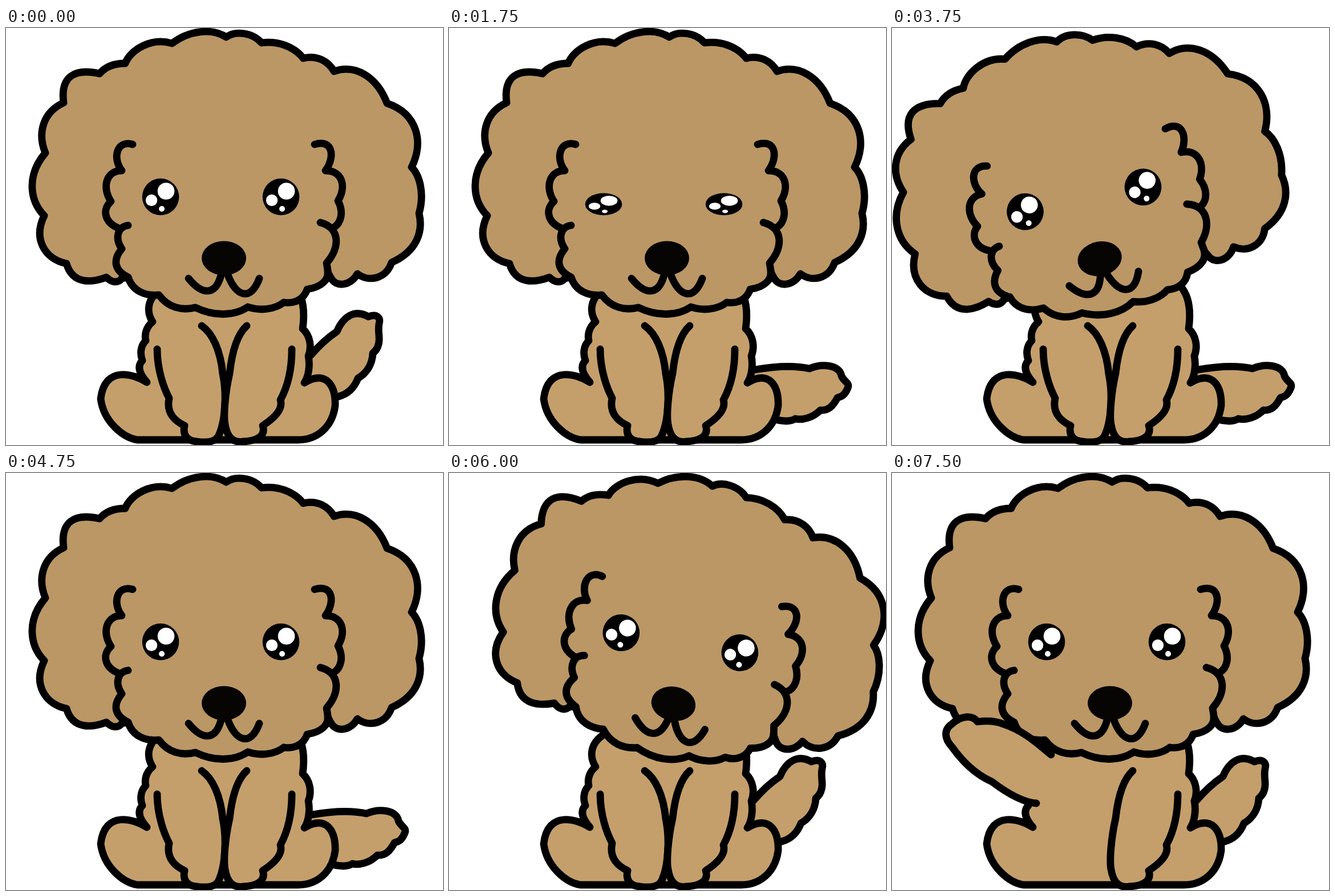
Recreate the animation shown at these times as an HTML page. Size 766 by 731 pixels, loop 7.75 s.

```html
<!DOCTYPE html>
<html lang="en">
<head>
<meta charset="utf-8">
<title>Puppy</title>
<style>
  html, body { margin: 0; width: 100%; height: 100%; overflow: hidden; background: #fff; }
  svg { display: block; width: 100vw; height: 100vh; }
  .line { stroke: #000; stroke-width: 12.8; stroke-linecap: round; stroke-linejoin: round; fill: none; }
  .coat { fill: #c49f6c; }
  .head { fill: #bb9766; }
</style>
</head>
<body>
<svg viewBox="0 0 766 731">
  <defs>
    <g id="eye">
      <circle cy="-32" r="32.3"/>
      <g fill="#fff">
        <circle cx="9.5" cy="-42" r="14.8"/>
        <circle cx="-16" cy="-26" r="10.2"/>
        <circle cx="2" cy="-11" r="5"/>
      </g>
    </g>
  </defs>

  <g id="tailUp">
    <path class="coat" d="M532 579L580 532C592 505 612 494 635 506L654 518L654 543L643 570L617 614L583 646L540 640Z"/>
    <path class="line coat" d="M534 574Q555 549 580 532C592 504 612 493 635 506C650 500 657 508 654 518C652 530 654 535 654 543C655 555 650 565 643 570C642 590 632 605 617 614C610 632 598 642 583 646"/>
  </g>
  <g id="tailDown">
    <path class="coat" d="M532 601L632 598L687 610L607 684L570 687L545 650Z"/>
    <path class="line coat" d="M536 599C570 593 605 591 632 597C655 587 685 591 688 610C693 621 703 622 699 631C693 646 685 647 681 648C673 663 665 671 651 670C638 683 620 688 607 685C598 691 585 689 575 687"/>
  </g>

  <path class="line coat" d="M272 458C245 475 247 500 257 515C244 525 243 540 245 548C235 558 235 572 239 583C230 592 233 605 247 621C225 607 173 590 166 650C171 690 205 718 230 722H512C545 722 572 700 577 662C578 625 560 600 523 622C531 610 533 590 530 575C536 560 534 540 520 527C523 505 524 472 505 452"/>
  <path id="armDown" class="line coat" d="M265 563C265 600 277 632 286 649C280 676 298 690 313 697C309 714 318 724 335 725C350 727 366 726 372 716C385 690 387 640 380 607C376 565 362 535 343 522"/>
  <path class="line coat" d="M422 522C402 540 395 578 392 605C384 640 381 680 384 695C388 720 400 727 415 725C440 724 456 715 450 697C470 684 486 668 481 652C493 630 501 600 501 563"/>

  <g id="head">
    <path class="line head" d="M209 62C218 38 255 16 291 27C320 5 360 -1 386 16C402 4 432 8 448 26C475 22 505 32 521 53C545 47 565 58 575 76C612 63 650 85 668 132C721 150 733 200 711 244C725 258 734 290 724 325C732 358 719 392 676 411C666 440 636 446 616 431C604 452 578 456 569 437L564 428C565 440 555 454 528 458C522 476 505 484 487 481C470 494 445 496 424 489C400 505 365 506 332 490C308 496 284 490 268 468C245 470 222 462 214 437L203 439C195 449 184 445 176 437C152 446 117 451 106 413C68 405 47 370 67 329C39 300 38 255 69 219C55 185 64 148 101 131C95 85 120 70 164 80C175 67 190 62 209 62Z"/>
    <path class="line" d="M222 204C194 196 186 228 203 250C175 250 168 280 184 304C168 318 172 342 200 352M214 346C196 348 190 368 203 387C188 405 188 424 214 437"/>
    <path class="line" d="M541 204C572 194 578 225 560 250C590 250 597 278 582 303C592 322 588 342 574 350M551 341C586 350 586 385 562 412L565 432"/>
    <path class="line" d="M320 439C346 471 368 467 377 433M389 433C403 471 429 480 444 439"/>
    <ellipse cx="382" cy="403.5" rx="39" ry="30" fill="#070404"/>
    <use id="eyeL" href="#eye"/>
    <use id="eyeR" href="#eye"/>
  </g>

  <path id="armUp" class="line coat" d="M279 494C250 470 230 452 195 440C180 434 165 434 150 436C140 423 120 426 105 440C90 450 92 466 105 480C125 508 150 530 175 541C200 560 228 577 253 579"/>
</svg>
<script>
  const STEP = 250, COUNT = 31;

  // [first step, last step, pose]
  const poses = [
    [5, 7, 'blink'],
    [8, 10, 'left'],
    [14, 16, 'left'],
    [22, 24, 'right'],
    [28, 30, 'wave'],
  ];
  const tilts = {
    left: 'translate(-18 1) rotate(-11.8 382 403)',
    right: 'translate(11.5 1) rotate(9.55 382 403)',
  };

  const el = id => document.getElementById(id);
  const show = (id, on) => el(id).setAttribute('display', on ? 'inline' : 'none');
  const move = (id, value) => el(id).setAttribute('transform', value);

  function draw(step) {
    const hit = poses.find(([a, b]) => step >= a && step <= b);
    const pose = hit ? hit[2] : 'rest';
    const lid = pose === 'blink' ? 0.6 : 1;
    const up = step % 2 === 0;

    show('tailUp', up);
    show('tailDown', !up);
    show('armUp', pose === 'wave');
    show('armDown', pose !== 'wave');
    move('head', tilts[pose] || '');
    move('eyeL', `translate(271 328) scale(1 ${lid})`);
    move('eyeR', `translate(482 328) scale(1 ${lid})`);
  }

  const start = performance.now();
  function tick() {
    const t = Math.max(0, performance.now() - start);
    draw(Math.floor(t / STEP) % COUNT);
    requestAnimationFrame(tick);
  }
  tick();
</script>
</body>
</html>
```
